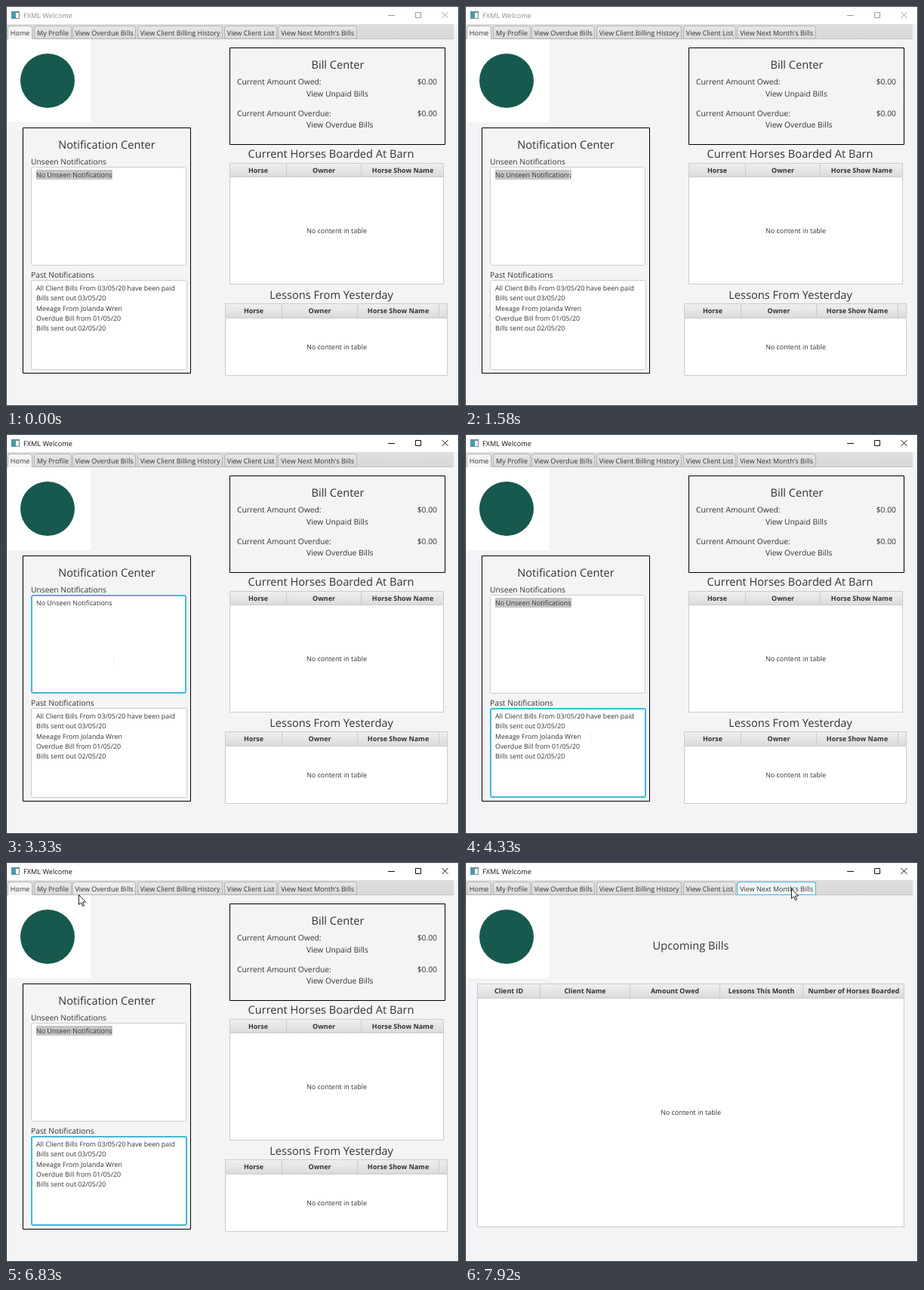
An HTML page with a canvas that plays this animation: 600x530 px, repeating every 8 s.

```html
<!DOCTYPE html>
<html lang="en">
<head>
<meta charset="utf-8">
<title>FXML Welcome</title>
<style>
html, body { margin: 0; width: 100%; height: 100%; overflow: hidden; background: #f4f3f5; }
canvas { display: block; }
</style>
</head>
<body>
<canvas id="stage" width="600" height="530"></canvas>
<script>
const ctx = document.getElementById('stage').getContext('2d');
const LOOP = 8000, STEP = 1000 / 12;
const INK = '#333', FOCUS = '#43b9d6', EDGE = '#cbcbcc';
const ACTIVATE = 24, PAST_FOCUS = 47, SWITCH = 95;

const tabs = [
  ['Home', 2, 35], ['My Profile', 37, 87], ['View Overdue Bills', 88, 172],
  ['View Client Billing History', 174, 287], ['View Client List', 289, 359],
  ["View Next Month's Bills", 360, 465]
];

const pastLines = [
  'All Client Bills From 03/05/20 have been paid', 'Bills sent out 03/05/20',
  'Meeage From Jolanda Wren', 'Overdue Bill from 01/05/20', 'Bills sent out 02/05/20'
];

// Pointer path: step, x, y
const path = [
  [10, 508, 300], [11, 124, 162], [14, 122, 196], [18, 136, 222], [22, 150, 226],
  [34, 150, 226], [40, 142, 300], [46, 165, 402], [58, 167, 403], [62, 215, 395],
  [64, 330, 285], [67, 450, 137], [70, 500, 215], [74, 515, 412], [76, 506, 410],
  [79, 250, 150], [82, 96, 43], [85, 130, 38], [89, 330, 40], [92, 440, 39], [95, 432, 35]
];

function pointerAt(n) {
  if (n < path[0][0]) return null;
  const i = path.findIndex(p => p[0] >= n);
  if (path[i][0] === n) return { x: path[i][1], y: path[i][2] };
  const [a, ax, ay] = path[i - 1], [b, bx, by] = path[i];
  const k = (n - a) / (b - a), e = k * k * (3 - 2 * k);
  return { x: Math.round(ax + (bx - ax) * e), y: Math.round(ay + (by - ay) * e) };
}

function text(s, x, y, size = 9, align = 'left', color = INK, weight = 400) {
  ctx.font = `${weight} ${size}px "Open Sans", "Noto Sans", sans-serif`;
  ctx.textAlign = align;
  ctx.fillStyle = color;
  ctx.fillText(s, x, y);
}

const heading = (s, x, y) => text(s, x, y, 14.6, 'center');
const label = (s, x, y, align) => text(s, x, y, 10.3, align);

function box(x, y, w, h, color) {
  ctx.fillStyle = color;
  ctx.fillRect(x, y, w, h);
}

function outline(x, y, w, h, color, width = 1, radius = 0) {
  ctx.strokeStyle = color;
  ctx.lineWidth = width;
  ctx.beginPath();
  ctx.roundRect(x, y, w, h, radius);
  ctx.stroke();
}

function line(x1, y1, x2, y2, color) {
  ctx.strokeStyle = color;
  ctx.lineWidth = 1;
  ctx.beginPath();
  ctx.moveTo(x1, y1);
  ctx.lineTo(x2, y2);
  ctx.stroke();
}

function shade(y1, y2, top, bottom) {
  const g = ctx.createLinearGradient(0, y1, 0, y2);
  g.addColorStop(0, top);
  g.addColorStop(1, bottom);
  return g;
}

function titleBar(active) {
  const c = active ? '#111' : '#999';
  box(0, 0, 600, 24, '#fff');
  box(7, 7, 11, 10, '#6f8c94');
  box(8, 9, 5, 7, '#3aa0ae');
  box(13, 9, 4, 7, '#f4f8f8');
  text('FXML Welcome', 23, 16, 9.2, 'left', active ? '#111' : '#8c8c8c');
  line(506, 12.5, 515, 12.5, c);
  outline(542.5, 8.5, 7, 7, c);
  line(577.5, 8, 585.5, 16, c);
  line(585.5, 8, 577.5, 16, c);
}

function tabBar(selected, pointer) {
  box(1, 24, 592, 20, shade(24, 44, '#dededf', '#d8d8d9'));
  line(1, 43.5, 593, 43.5, '#c4c4c5');
  tabs.forEach(([name, x1, x2], i) => {
    const on = i === selected;
    const hover = pointer && pointer.y >= 26 && pointer.y < 44 && pointer.x >= x1 && pointer.x < x2;
    ctx.beginPath();
    ctx.roundRect(x1 + 0.5, 26.5, x2 - x1 - 1, on ? 18 : 17, [3, 3, 0, 0]);
    ctx.fillStyle = on ? '#f4f3f5' : hover ? shade(26, 44, '#f0f0f0', '#e2e2e3') : shade(26, 44, '#e8e8e9', '#d6d6d7');
    ctx.fill();
    ctx.strokeStyle = '#b4b4b5';
    ctx.lineWidth = 1;
    ctx.stroke();
    if (on) box(x1 + 1, 43, x2 - x1 - 2, 2, '#f4f3f5');
    if (on && i > 0) outline(x1 + 0.5, 26.5, x2 - x1 - 1, 17, FOCUS, 1, 2);
    text(name, (x1 + x2) / 2 + 0.1, 39, 9, 'center');
  });
}

function logoSpot() {
  box(1, 44, 111, 110, '#fff');
  ctx.fillStyle = '#17594f';
  ctx.beginPath();
  ctx.arc(55, 99, 36, 0, 7);
  ctx.fill();
}

function textArea(x, y, w, h, focused) {
  ctx.fillStyle = '#fff';
  ctx.beginPath();
  ctx.roundRect(x, y, w, h, 2);
  ctx.fill();
  if (focused) outline(x + 1, y + 1, w - 2, h - 2, FOCUS, 2, 2);
  else outline(x + 0.5, y + 0.5, w - 1, h - 1, EDGE, 1, 2);
}

// edges: column boundaries, first and last being the table sides
function table(edges, top, bottom, head, names, emptyX, emptyY) {
  const left = edges[0], right = edges[edges.length - 1];
  box(left, top, right - left, bottom - top, '#fff');
  box(left, top, right - left, head, shade(top, top + head, '#f0f0f1', '#dadadb'));
  line(left, top + head - 0.5, right, top + head - 0.5, EDGE);
  edges.slice(1, -1).forEach(x => line(x + 0.5, top, x + 0.5, top + head, EDGE));
  outline(left + 0.5, top + 0.5, right - left - 1, bottom - top - 1, EDGE);
  names.forEach((s, i) => text(s, (edges[i] + edges[i + 1]) / 2 + 0.5, top + 13.4, 8.95, 'center', INK, 700));
  text('No content in table', emptyX, emptyY, 9, 'center');
}

function homePage(focus) {
  outline(22.5, 161.5, 222, 325, '#000');
  heading('Notification Center', 133.5, 189);
  label('Unseen Notifications', 33, 210);
  textArea(33, 213, 206, 131, focus === 'unseen');
  if (focus !== 'unseen') box(40, 217, 101, 13, '#c4c4c4');
  text('No Unseen Notifications', 40, 227.2, 8.9);
  label('Past Notifications', 33, 360);
  textArea(33, 363, 207, 119, focus === 'past');
  pastLines.forEach((s, i) => text(s, 40, 377.2 + i * 13.2, 8.9));

  outline(296.5, 55.5, 285, 128, '#000');
  heading('Bill Center', 439.5, 83);
  [['Owed', 'Unpaid', 104], ['Overdue', 'Overdue', 145.5]].forEach(([state, kind, y]) => {
    label(`Current Amount ${state}:`, 306, y);
    label('$0.00', 571, y, 'right');
    label(`View ${kind} Bills`, 398, y + 15.8);
  });

  const cols = ['Horse', 'Owner', 'Horse Show Name'];
  heading('Current Horses Boarded At Barn', 430.5, 201);
  table([296, 371, 470, 580], 208, 369, 19, cols, 438, 301);
  heading('Lessons From Yesterday', 431, 388);
  table([290, 365, 465, 573, 585], 394, 490, 20, cols, 438, 454.6);
}

function billsPage() {
  heading('Upcoming Bills', 299, 116);
  table([16, 99, 218, 337, 447, 582], 161, 484, 20,
    ['Client ID', 'Client Name', 'Amount Owed', 'Lessons This Month', 'Number of Horses Boarded'], 299, 335);
}

function drawPointer({ x, y }) {
  const inText = x > 33 && x < 238 && ((y > 213 && y < 343) || (y > 363 && y < 481));
  if (inText) {
    line(x + 0.5, y - 6, x + 0.5, y + 7, '#ececee');
    return;
  }
  ctx.beginPath();
  [[0, 0], [0, 13], [3, 10.3], [5, 15], [7, 14.2], [5, 9.6], [9, 9.4]]
    .forEach(([dx, dy]) => ctx.lineTo(x + dx + 0.5, y + dy + 0.5));
  ctx.closePath();
  ctx.fillStyle = '#fff';
  ctx.fill();
  ctx.strokeStyle = '#222';
  ctx.lineWidth = 1;
  ctx.stroke();
}

function draw(t) {
  // Twelve steps a second, every sixth one held
  let n = Math.min(95, Math.floor((t + 4) / STEP));
  if (n % 6 === 3) n--;
  const active = n >= ACTIVATE, bills = n >= SWITCH;
  const focus = !active ? '' : n < PAST_FOCUS ? 'unseen' : 'past';
  const pointer = pointerAt(n);

  ctx.textRendering = 'geometricPrecision';
  box(0, 0, 600, 530, '#f4f3f5');
  titleBar(active);
  tabBar(bills ? 5 : 0, pointer);
  logoSpot();
  if (bills) billsPage();
  else homePage(focus);
  outline(0.5, 0.5, 599, 529, active ? '#1c2a2c' : '#354347');
  if (pointer) drawPointer(pointer);
}

const start = performance.now();
function tick() {
  draw((performance.now() - start) % LOOP);
  requestAnimationFrame(tick);
}
tick();
</script>
</body>
</html>
```
